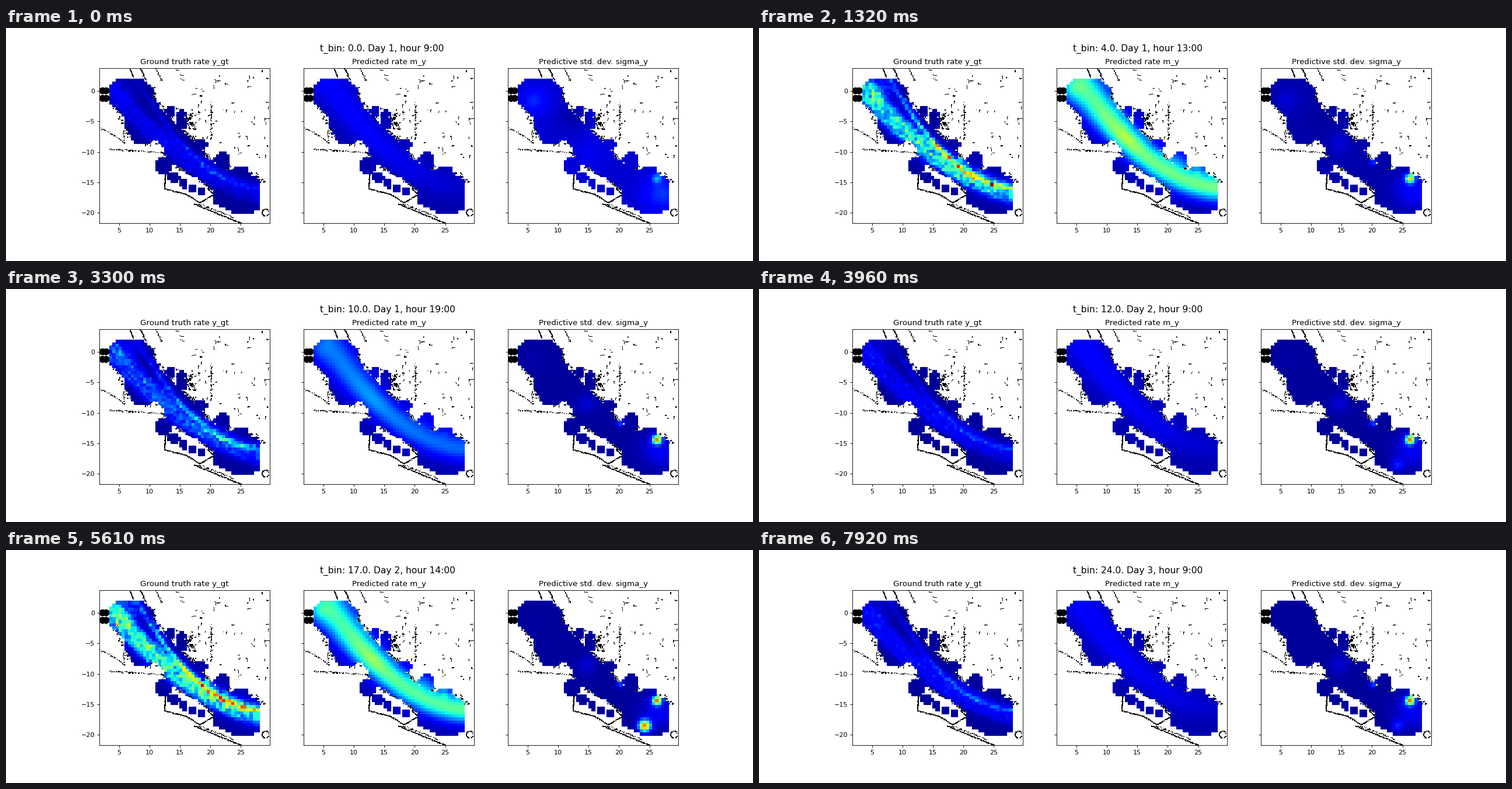
A matplotlib script that plays this animation: 1280x400 px, repeating every 8 s.

```python
import numpy as np
import matplotlib.pyplot as plt
from matplotlib.animation import FuncAnimation
from matplotlib.path import Path

# Timing: one bin per 330 ms, drawn on an 80 ms clock
STEP, FRAMES, BIN_MS, BINS = 80, 100, 330, 25

# Key points are given in screen pixels of the first panel
LEFT, TOP, SCALE = 160, 68.8, 10.44
XMIN, XMAX, YMIN, YMAX = 1.78, 29.73, -21.75, 3.77

ENTRANCE = [(177, 104), (192, 86), (234, 86), (250, 104)]
UPPER_EDGE = [(250, 104), (252, 120), (270, 146), (290, 168), (308, 182),
              (333, 208), (344, 224), (383, 244), (406, 250), (421, 252),
              (436, 260)]
EXIT = [(436, 308), (415, 318), (392, 318), (356, 300)]
LOWER_EDGE = [(358, 276), (300, 240), (276, 228), (273, 204), (258, 190),
              (240, 196), (218, 196), (204, 165), (203, 150), (180, 128)]
ALCOVES = [(282, 143, 8), (300, 148, 7), (301, 163, 9), (334, 198, 9),
           (371, 226, 13), (403, 246, 10), (270, 235, 13), (287, 256, 9),
           (304, 267, 6), (319, 275, 7.5), (335, 280, 6.5)]

WALLS = [[(212, 69), (218, 84)], [(230, 69), (240, 90)],
         [(274, 238), (272, 276), (310, 286), (332, 300), (357, 286),
          (346, 276)],
         [(322, 302), (403, 335)]]
BROKEN_WALLS = [[(161, 172), (202, 196)], [(178, 208), (271, 214)],
                [(202, 178), (203, 199)], [(352, 130), (352, 193)],
                [(258, 71), (267, 92)], [(330, 302), (390, 325)]]


def resample(points, n):
    """Evenly spaced points along a polyline."""
    pts = np.array(points, float)
    s = np.r_[0, np.cumsum(np.hypot(*np.diff(pts, axis=0).T))]
    t = np.linspace(0, s[-1], n)
    return np.column_stack([np.interp(t, s, col) for col in pts.T])


def lane(x0, x1, y0, rise, bend):
    """Distance of each cell to a parabola, and how far along it lies."""
    t = np.linspace(0, 1, 300)
    curve = resample(np.c_[x0 + (x1 - x0) * t, y0 + rise * t - bend * t * t],
                     300)
    d = np.hypot(px[:, None] - curve[:, 0], py[:, None] - curve[:, 1])
    return d.min(axis=1), t[d.argmin(axis=1)]


def bump(x0, y0, r):
    return np.exp(-((px - x0) ** 2 + (py - y0) ** 2) / r ** 2)


def floor_plan():
    rng = np.random.default_rng(4)
    ink = np.zeros((266, 292))

    def stamp(x, y, w, h):
        i, j = int(round(y - TOP)), int(round(x - LEFT))
        ink[max(i, 0):max(i + h, 0), max(j, 0):max(j + w, 0)] = 1

    def trace(points, jitter, keep):
        span = np.hypot(*np.diff(np.array(points), axis=0).T).sum()
        for x, y in resample(points, int(span * 1.6)):
            if rng.random() < keep:
                dx, dy = rng.normal(0, jitter, 2)
                stamp(x + dx - 1, y + dy - 1, *rng.integers(1, 3, 2))

    def clump(x, y, steps):
        for _ in range(steps):
            stamp(x, y, *rng.integers(1, 3, 2))
            x, y = (x, y) + rng.normal(0, 1.2, 2)

    for wall in WALLS:
        trace(wall, .4, 1)
    for wall in BROKEN_WALLS:
        trace(wall, .7, .45)
    a = np.linspace(.4, 6, 30)
    trace(np.c_[445 + 6 * np.cos(a), 317 + 6 * np.sin(a)], .3, .9)

    # Clutter lines the walkable area in uneven patches
    for edge in (UPPER_EDGE, LOWER_EDGE):
        for k, (x, y) in enumerate(resample(edge, 240)):
            if rng.random() < .55 + .45 * np.sin(k / 7):
                clump(*rng.normal((x, y), 3), 5)
    for _ in range(45):
        clump(*rng.normal((314, 160), (7, 8)), 4)

    # Sparse fragments of rooms beyond the upper edge
    for _ in range(70):
        x, y = rng.uniform((275, 72), (450, 225))
        if y < x - 125:
            w, h = rng.permutation([rng.integers(2, 7), 1])
            stamp(x, y, w, h)
            clump(x, y, 2)

    yy, xx = np.mgrid[:266, :292]
    for y in (108, 121):
        for x in (165, 171):
            ink[np.hypot(xx + LEFT - x, yy + TOP - y) < 6] = 1
    return ink


# Half-metre cells inside the observed area
gx, gy = np.meshgrid(np.arange(3.75, 28, .5), np.arange(-19.75, 2, .5))
gx, gy = gx.ravel(), gy.ravel()
px, py = LEFT + (gx - XMIN) * SCALE, TOP + (YMAX - gy) * SCALE
outline = Path(ENTRANCE + UPPER_EDGE + EXIT + LOWER_EDGE)
inside = outline.contains_points(np.c_[px, py])
for x0, y0, r in ALCOVES:
    inside |= np.hypot(px - x0, py - y0) < r
gx, gy, px, py = (v[inside] for v in (gx, gy, px, py))

# Truth: a broad band with a busy ridge on its upper side
band_d, band_s = lane(182, 440, 104, 296, 116)
ridge_d, ridge_s = lane(226, 438, 88, 367, 182)
truth_shape = ((.4 + .15 * np.sin(np.pi * band_s))
               * np.exp(-(band_d / 17) ** 4)
               + (.25 + .35 * np.minimum(1, 2.5 * ridge_s))
               * np.exp(-(ridge_d / 4.2) ** 2)
               + .12 * np.exp(-(band_d / 28) ** 2) + .25 * bump(206, 102, 24))
texture = np.random.default_rng(11).uniform(.82, 1.18, px.size)

# Prediction: one smooth lane
pred_d, pred_s = lane(205, 440, 95, 341, 164)
pred_shape = np.exp(-(pred_d / (31 - 8 * np.minimum(1, 2.5 * pred_s))) ** 2)
pred_height = (.68 + .2 * np.minimum(1, 4 * pred_s) + .12 * pred_s ** 6
               + .16 * np.exp(-((pred_s - .39) / .09) ** 2))
day_shape = (pred_height * pred_shape + .28 * bump(186, 104, 22)
             + .25 * bump(403, 245, 9) + .2 * bump(371, 222, 14))
morning_shape = (.08 - .06 * pred_s ** 2) * pred_shape


def rate(b):
    """Steep rise until 13:00, slower fall in the afternoon."""
    return np.interp(b % 12, [0, 4, 8, 12], [.12, .56, .45, .12])


def truth(b):
    noise = texture * np.random.default_rng(100 + b).gamma(30, 1 / 30, px.size)
    return .02 + rate(b) * (1 + .15 * (b // 12)) * truth_shape * noise


def predicted(b):
    return .04 + morning_shape + (rate(b) - .12) * day_shape


def deviation(b):
    fade = np.exp(-b / 3)
    early = (.05 * bump(205, 125, 28) + .03 * bump(300, 215, 30)
             + .07 * bump(420, 280, 32) - .03 * bump(270, 150, 24))
    late = (.05 * bump(295, 195, 16) + .2 * bump(352, 228, 6)
            + .06 * bump(412, 270, 26))
    hot = .2 + .52 * (1 - fade)
    second = .76 * np.exp(-((b - 18) / 5.2) ** 4)
    return (.025 + fade * (.045 + early) + (1 - fade) * late
            + .04 * bump(205, 122, 18) * np.exp(-b / 8)
            + .04 * bump(428, 285, 22)
            + hot * bump(416, 257, 7.5) + second * bump(395, 300, 10))


def caption(b):
    return f"t_bin: {b}.0. Day {1 + b // 12}, hour {9 + b % 12}:00"


PANELS = [("Ground truth rate y_gt", truth), ("Predicted rate m_y", predicted),
          ("Predictive std. dev. sigma_y", deviation)]
values = [[field(b) for _, field in PANELS] for b in range(BINS)]

fig, axes = plt.subplots(1, 3, figsize=(16, 5), dpi=80, sharey=True)
plan = floor_plan()
dots = []
for ax, (title, _), v in zip(axes, PANELS, values[0]):
    ax.imshow(plan, cmap="binary", vmin=0, vmax=1, interpolation="nearest",
              extent=(XMIN, XMAX, YMIN, YMAX))
    dots.append(ax.scatter(gx, gy, c=v, marker="s", cmap="jet",
                           vmin=0, vmax=1))
    ax.set(title=title, xlim=(XMIN, XMAX), ylim=(YMIN, YMAX), aspect="equal",
           xticks=range(5, 30, 5), yticks=range(-20, 5, 5))
label = fig.text(.42, .9, caption(0), fontsize=14)


def update(k):
    b = min((k * STEP + 70) // BIN_MS, BINS - 1)
    for dot, v in zip(dots, values[b]):
        dot.set_array(v)
    label.set_text(caption(b))
    return [*dots, label]


anim = FuncAnimation(fig, update, frames=FRAMES, interval=STEP,
                     repeat=True, repeat_delay=0, blit=False)
plt.show()
```
